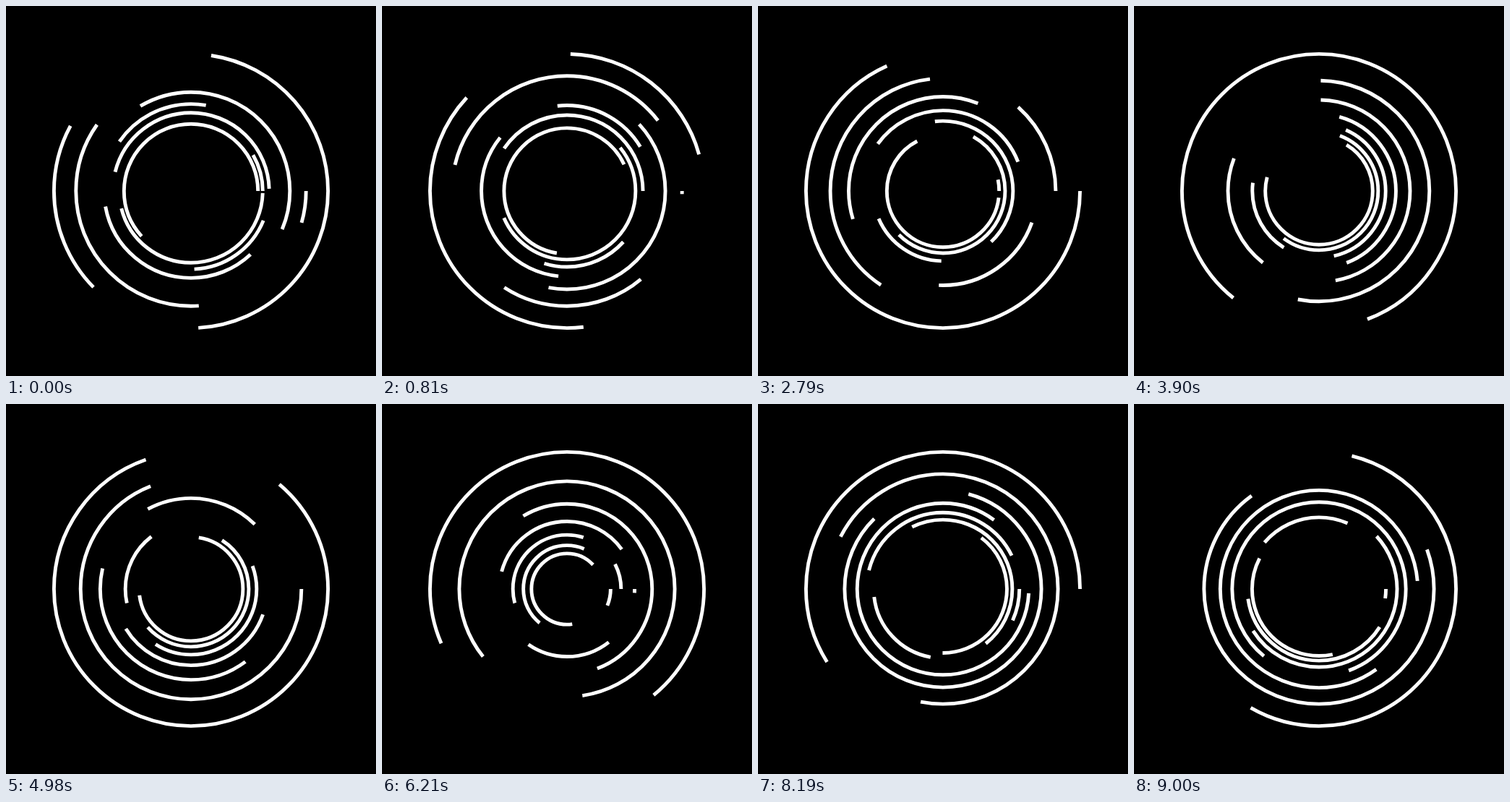
These frames come from a looping animation (512 by 512 pixels, 9.03 s). An HTML page:

```html
<!DOCTYPE html>
<html lang="en">
<head>
<meta charset="utf-8">
<title>Dashed rings</title>
<style>
  html, body { margin: 0; width: 100%; height: 100%; overflow: hidden; background: #000; }
  svg { display: block; width: 100vw; height: 100vh; }
  circle { fill: none; stroke: #fff; stroke-width: 4.9; }
</style>
</head>
<body>
<svg id="stage" viewBox="0 0 512 512"></svg>
<script>
const LOOP = 9.03, FRAME = 0.03; // seconds
const RINGS = 7, OUTER = 189.6;
const TURNS = 360 * RINGS, SPIN = TURNS / 15;

// One dashed band, wound once around each ring: dash, gap, ... in degrees.
const BAND = '139.9 48.5 73 70.1 129.1 216.4 122.9 44.9 65.3 ' +
             '106.6 164.2 164 235.6 105.8 300.8 59.4 303.6 169.9';

const wave = (t, period, peak) => Math.cos(2 * Math.PI * (t - peak) / period);
const sigmoid = x => 1 / (1 + Math.exp(-x));
const ease = (t, from, to) => {
  const u = Math.min(Math.max((t - from) / (to - from), 0), 1);
  return u * u * (3 - 2 * u);
};

// Band offset between neighbouring rings: winds up steadily, then slips back.
const twistAt = t => 192.4 + 35.85 * t - 240 * sigmoid((t - 7.17) / 0.59);

// Outermost spacing: widens in two stages, then closes.
const gapAt = t => 30.4 + 6.4 * ease(t, 1.65, 3.9) + 3.7 * ease(t, 4.98, 6.21)
                        - 10 * ease(t, 6.21, 7.35);

// Ratio of each spacing to the one outside it.
const shrinkAt = t => 0.747 + 0.0012 * t + 0.025 * wave(t, 5.15, 1.65);

const stage = document.getElementById('stage');
const rings = Array.from({ length: RINGS }, () => {
  const ring = document.createElementNS('http://www.w3.org/2000/svg', 'circle');
  ring.setAttribute('cx', 256);
  ring.setAttribute('cy', 256);
  ring.setAttribute('pathLength', 360);
  ring.setAttribute('stroke-dasharray', BAND);
  return stage.appendChild(ring);
});

function draw(t) {
  const twist = twistAt(t), shrink = shrinkAt(t);
  let offset = TURNS + 53 - SPIN * t;
  let radius = OUTER, gap = gapAt(t);
  for (const ring of rings) {
    ring.setAttribute('r', radius.toFixed(2));
    ring.setAttribute('stroke-dashoffset', (offset % TURNS).toFixed(2));
    offset += twist;
    radius -= gap;
    gap *= shrink;
  }
}

const begin = performance.now();
function tick() {
  const t = (performance.now() - begin) / 1000 % LOOP;
  draw(Math.floor(t / FRAME + 1e-6) * FRAME);
  requestAnimationFrame(tick);
}
draw(0);
requestAnimationFrame(tick);
</script>
</body>
</html>
```
